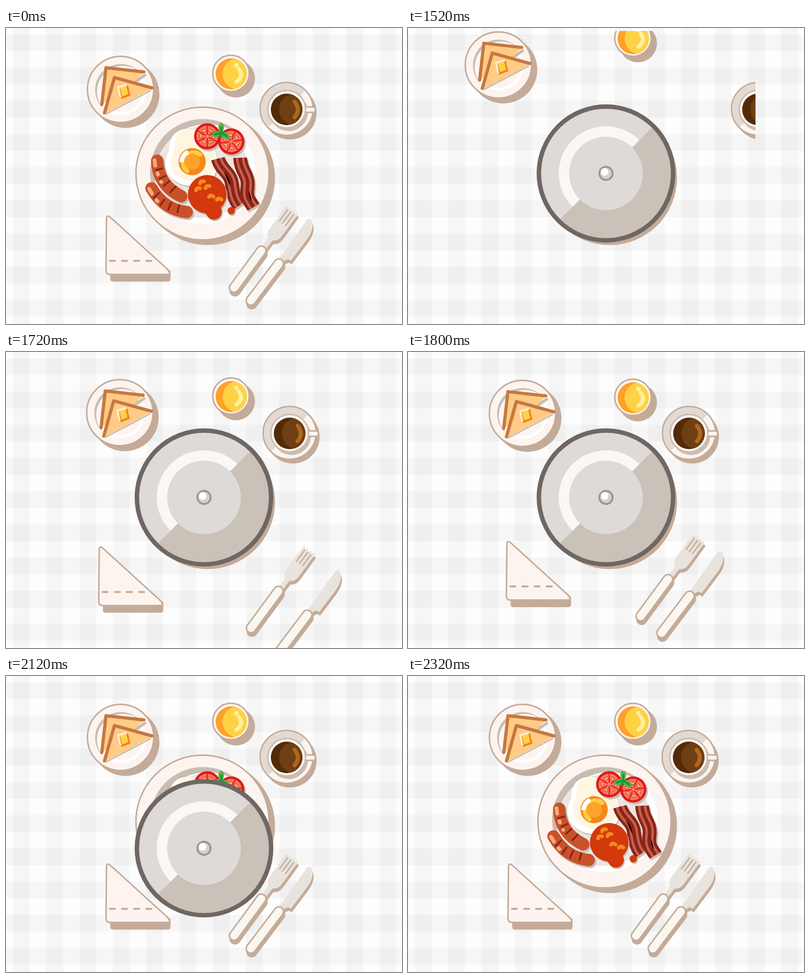
Recreate the animation shown at these times as an HTML page. Size 800 px wide and 600 px high, loop 3.64 s.

```html
<!DOCTYPE html>
<html lang="en">
<head>
<meta charset="utf-8">
<title>Breakfast</title>
<style>
  html, body { margin: 0; width: 100%; height: 100%; overflow: hidden; background: #fdfdfd; }
  svg { display: block; width: 100vw; height: 100vh; }
  .rim { fill: #fdf4ef; stroke: #c4ab99; stroke-width: 3; }
  .line { fill: none; stroke-linecap: round; stroke-linejoin: round; }
  .food { filter: drop-shadow(3px 4px 0 #c9bdb2); }
  .low { filter: drop-shadow(2px 3px 0 #c9bdb2); }
  .drop { filter: drop-shadow(2px 7px 0 #c4ab99); }
  .handle { fill: #faf6f0; stroke: #c4ab99; stroke-width: 3; }
  .steel { fill: #e8e3dd; }
  .bacon path { fill: none; }
</style>
</head>
<body>
<svg viewBox="0 0 800 600">
  <defs>
    <pattern id="columns" x="14" width="67.3" height="600" patternUnits="userSpaceOnUse">
      <rect width="33.7" height="600" fill-opacity=".027"/>
    </pattern>
    <pattern id="rows" y="13" width="800" height="67.3" patternUnits="userSpaceOnUse">
      <rect width="800" height="33.7" fill-opacity=".027"/>
    </pattern>
    <clipPath id="frame"><rect x="102" y="6" width="600" height="600"/></clipPath>
    <clipPath id="well"><circle cx="398" cy="291.5" r="107"/></clipPath>
    <clipPath id="dish"><circle cx="232" cy="125" r="52"/></clipPath>
    <clipPath id="juiceTop"><circle cx="455" cy="93" r="31.5"/></clipPath>
    <clipPath id="coffeeTop"><circle cx="567" cy="165" r="32"/></clipPath>
    <clipPath id="cup"><circle cx="567" cy="165" r="38"/></clipPath>

    <g id="tomato">
      <circle r="26.5" fill="#df1a1a"/>
      <circle r="21.5" fill="#ff7b60"/>
      <g id="spokes"></g>
      <circle r="3.5" fill="#ff7b60"/>
    </g>
    <path id="baconA" d="M428 265C434 288 453 293 456 314S460 345 471 360"/>
    <path id="baconB" d="M473 263C474 290 491 298 488 322S491 348 500 363"/>
    <path id="sausageA" d="M305.500 269Q307 318 354 341"/>
    <path id="sausageB" d="M294 325Q319 368 365 373"/>
    <path id="bean" d="M-4 3Q-3 -3 4 -1" class="line" stroke="#f58a1f" stroke-width="7.500"/>
  </defs>

  <rect width="800" height="600" fill="#fdfdfd"/>
  <rect width="800" height="600" fill="url(#columns)"/>
  <rect width="800" height="600" fill="url(#rows)"/>

  <!-- main plate -->
  <circle cx="407.500" cy="304" r="136" fill="#c4ab99"/>
  <g id="plate">
    <circle class="rim" cx="397" cy="295" r="134.500"/>
    <g clip-path="url(#well)">
      <rect x="280" y="180" width="240" height="230" fill="#c9bdb2"/>
      <circle cx="407" cy="301" r="106" fill="#fff"/>
      <circle cx="398" cy="292" r="93" fill="#ebe6e1"/>
    </g>

    <g class="low">
      <path fill="#fff" d="M362 205C385 203 400 215 408 232C425 245 430 265 426 285C420 310 400 321 372 320C345 319 321 300 322 272C323 258 330 252 330 240C332 215 348 206 362 205Z"/>
      <path fill="#fef6e0" d="M366 206C386 204 400 216 407 233C423 246 428 266 423 282C416 303 398 311 376 310C352 309 333 292 333 272C333 258 341 250 341 238C340 219 351 207 366 206Z"/>
    </g>
    <circle cx="376" cy="271" r="27.500" fill="#f4881d"/>
    <path class="line" stroke="#ffce3f" stroke-width="9" stroke-linecap="butt" d="M366 290A21 21 0 1 1 392 257"/>
    <path class="line" stroke="#fff" stroke-width="9" style="stroke-linecap:butt" d="M355 272A21 21 0 0 1 368 251.500"/>
    <circle cx="376" cy="271" r="16" fill="#ffa22a"/>

    <g class="food">
      <use href="#tomato" transform="translate(406.500 219.500)"/>
      <use href="#tomato" transform="translate(455 230) rotate(22)"/>
    </g>
    <g fill="#5fb04a">
      <path d="M434 212C426 204 428 193 435 192C442 194 443 204 436 212Z"/>
      <path d="M435 212C428 206 419 209 414 218C423 225 431 221 436 213Z"/>
      <path d="M435 212C443 208 451 213 454 224C445 228 436 224 434 214Z"/>
    </g>
    <path class="line" stroke="#0c9b3e" stroke-width="4" d="M435 201V212L421 216M435 212L447 220M435 212L431 222"/>

    <g class="food line" stroke="#c9512a" stroke-width="25">
      <use href="#sausageA"/><use href="#sausageB"/>
    </g>
    <path class="line" stroke="#86240f" stroke-width="3.500" style="stroke-linecap:butt"
      d="M302 289L317 284M309 306L324 299M318 321L331 309M331 334L344 320M297 346L310 333M311 361L321 346M327 370L334 353M346 375L350 358"/>
    <path class="line" stroke="#f2ab7f" stroke-width="7.500" d="M300 268L301.500 279M306 294L307 297M289 326L295 336M304 349L306 351"/>
    <circle cx="313.500" cy="312" r="3.700" fill="#f2ab7f"/>

    <g class="bacon food">
      <g stroke="#8b2318" stroke-width="28"><use href="#baconB"/></g>
      <g stroke="#c4614a" stroke-width="17"><use href="#baconB"/></g>
      <g stroke="#8b2318" stroke-width="7"><use href="#baconB"/></g>
      <g stroke="#8b2318" stroke-width="28"><use href="#baconA"/></g>
      <g stroke="#c4614a" stroke-width="17"><use href="#baconA"/></g>
      <g stroke="#8b2318" stroke-width="7"><use href="#baconA"/></g>
    </g>

    <g class="low" fill="#d4380d">
      <circle cx="406.500" cy="337" r="39"/>
      <circle cx="420" cy="372.500" r="16"/>
      <path d="M395 372Q404 375 406 380L425 365ZM434 360Q433 366 436 371L420 368Z"/>
      <circle cx="455" cy="370.500" r="7.500"/>
    </g>
    <use href="#bean" x="396" y="312"/>
    <use href="#bean" x="407" y="321.500"/>
    <use href="#bean" x="388" y="326"/>
    <use href="#bean" transform="translate(415 341) rotate(25)"/>
    <use href="#bean" transform="translate(431 347) rotate(25)"/>
  </g>

  <g id="table" clip-path="url(#frame)">
    <g id="toast">
      <circle cx="241.500" cy="134" r="68.500" fill="#c4ab99"/>
      <circle class="rim" cx="231.500" cy="124.500" r="67"/>
      <g clip-path="url(#dish)">
        <rect x="175" y="70" width="115" height="115" fill="#cbbeb4"/>
        <circle cx="236" cy="129" r="52" fill="#fff"/>
        <circle cx="232" cy="125" r="45.500" fill="#fdf4ef"/>
      </g>
      <path class="line" stroke="#c9bdb2" stroke-width="6" d="M280 96L262 108"/>
      <path fill="#ffcb85" d="M194 155L202 80L279 89L262 106Z"/>
      <path class="line" stroke="#c67840" stroke-width="6.500" d="M193.500 155L202 80.500L278.500 89"/>
      <path class="line" stroke="#c9bdb2" stroke-width="3" d="M203 174L292 127"/>
      <path fill="#ffcb85" d="M199 174L219 100L297 122Z"/>
      <path class="line" stroke="#c67840" stroke-width="6.500" d="M199 172L219 100.500L295 121.500"/>
      <path fill="#f0831d" d="M228 119L246 114L251.500 137L233 144Z"/>
      <path fill="#ffd145" d="M230 121L243 117L247 134L235 139Z"/>
      <path fill="none" stroke="#ffecd2" stroke-width="4" d="M231 141L227 120L245 115"/>
    </g>

    <g id="juice">
      <circle cx="464.500" cy="102.500" r="38.500" fill="#c4ab99"/>
      <circle class="rim" cx="454.500" cy="92" r="36.800"/>
      <circle cx="455" cy="93" r="31.500" fill="#ffa029"/>
      <circle cx="469" cy="93" r="31.500" fill="#ffd145" clip-path="url(#juiceTop)"/>
      <path class="line" stroke="#fff1a0" stroke-width="8" d="M470.500 83Q481 98 465.500 109"/>
      <circle cx="465.500" cy="75.500" r="4.500" fill="#fff1a0"/>
    </g>

    <g id="coffee">
      <circle cx="573.500" cy="172" r="54" fill="#c4ab99"/>
      <circle class="rim" cx="567" cy="164" r="53.500"/>
      <path fill="#e2dad3" d="M603.770 127.230A52 52 0 0 0 530.230 200.770Z"/>
      <circle cx="571" cy="170" r="39" fill="#c9bdb2"/>
      <rect class="rim" x="600" y="160" width="25" height="11" rx="5"/>
      <circle cx="567" cy="164.500" r="38" fill="#fdf8f4" stroke="#c9bdb2" stroke-width="3"/>
      <circle cx="567" cy="165" r="32" fill="#542a07"/>
      <circle cx="583.500" cy="165" r="32" fill="#6e3f12" clip-path="url(#coffeeTop)"/>
      <path class="line" stroke="#b0671f" stroke-width="8" d="M583 149.500Q596 165 583 181"/>
    </g>

    <g id="napkin">
      <rect x="210.500" y="490" width="122" height="24" rx="5" fill="#c4ab99"/>
      <path class="rim" d="M203 387Q203 378 210 383L325 488Q331 494 331 499.500H210Q202 499.500 202 491Z"/>
      <path class="line" stroke="#c4ab99" stroke-width="4" stroke-dasharray="10 14.500" d="M210 472H294"/>
    </g>

    <g id="fork" class="drop">
      <g transform="translate(461 526) rotate(36.300)">
        <path class="steel" d="M-4 -95V-122C-11 -126 -13 -133 -13 -141V-170H16V-141C16 -133 13 -126 6 -122V-95Z"/>
        <path class="line" stroke="#e8e3dd" stroke-width="5.500" d="M-10 -168V-194M-2.500 -168V-194M5.500 -168V-194M13 -168V-194"/>
        <path class="line" stroke="#c4ab99" stroke-width="2.500" d="M-6.200 -163V-191M1.500 -163V-191M9.300 -163V-191"/>
        <rect class="handle" x="-9.500" y="-102" width="19" height="112" rx="9.500"/>
      </g>
    </g>

    <g id="knife" class="drop">
      <g transform="translate(495 552) rotate(37)">
        <path class="steel" d="M-5 -98L-8 -197Q-8 -205 -1 -204Q16 -194 16 -166V-112H10L6 -106V-98Z"/>
        <rect class="handle" x="-9.500" y="-103" width="19" height="113" rx="9.500"/>
      </g>
    </g>
  </g>

  <g id="cloche">
    <g transform="translate(400 294.800)">
      <circle r="135.500" fill="#dddad7"/>
      <g transform="rotate(-45)">
        <path fill="#cac1b8" d="M-135 0A135 135 0 0 0 135 0Z"/>
        <path fill="#f9f8f6" d="M-95.500 0A95.500 95.500 0 0 1 95.500 0Z"/>
      </g>
      <circle r="74.500" fill="#dddad7"/>
      <circle r="135.600" fill="none" stroke="#6f6763" stroke-width="9"/>
      <circle r="13.300" fill="#d6d1cd" stroke="#9e968f" stroke-width="4"/>
      <circle cx="-3" cy="-3" r="7.700" fill="#fff"/>
    </g>
  </g>
</svg>

<script>
  const LOOP = 3640, STEP = 40;
  const COVER = 1120, ENTER = 1440, LIFT = 1960, GONE = 2320;
  const get = id => document.getElementById(id);

  // start offset x, y and travel time in ms
  const entries = {
    toast: [-122, -124, 478],
    juice: [0, -172, 496],
    coffee: [330, 0, 508],
    napkin: [-379, 371, 586],
    fork: [643, 617, 632],
    knife: [906, 876, 660]
  };

  let cells = '';
  for (let a = 0; a < 360; a += 60) {
    cells += `<g transform="rotate(${a})">
      <path d="M0 0V-21.500" stroke="#df1a1a" stroke-width="2.500"/>
      <path d="M5.500 -14L6 -10.500M9.500 -11.500L7.500 -9" class="line" stroke="#d5341f" stroke-width="4.500"/>
      <path d="M5.500 -14L6 -10.500M9.500 -11.500L7.500 -9" class="line" stroke="#ffdfae" stroke-width="2"/>
    </g>`;
  }
  get('spokes').innerHTML = cells;

  const show = (el, on) => el.setAttribute('visibility', on ? 'visible' : 'hidden');
  const move = (el, x, y) => el.setAttribute('transform', `translate(${x.toFixed(2)} ${y.toFixed(2)})`);

  function draw(time) {
    const t = Math.floor(time % LOOP / STEP) * STEP;
    show(get('table'), t < COVER || t >= ENTER);
    for (const [id, [x, y, span]] of Object.entries(entries)) {
      const moving = t >= ENTER && t <= LIFT;
      const left = moving ? Math.max(0, 1 - (t - ENTER) / span) ** 5 : 0;
      move(get(id), x * left, y * left);
    }
    const covered = t >= COVER && t < GONE;
    show(get('cloche'), covered);
    show(get('plate'), !covered || t > LIFT);
    move(get('cloche'), 0, 54.5 * (Math.max(0, t - LIFT) / 160) ** 3);
  }

  const start = performance.now();
  function tick() {
    draw(performance.now() - start);
    requestAnimationFrame(tick);
  }
  tick();
</script>
</body>
</html>
```
